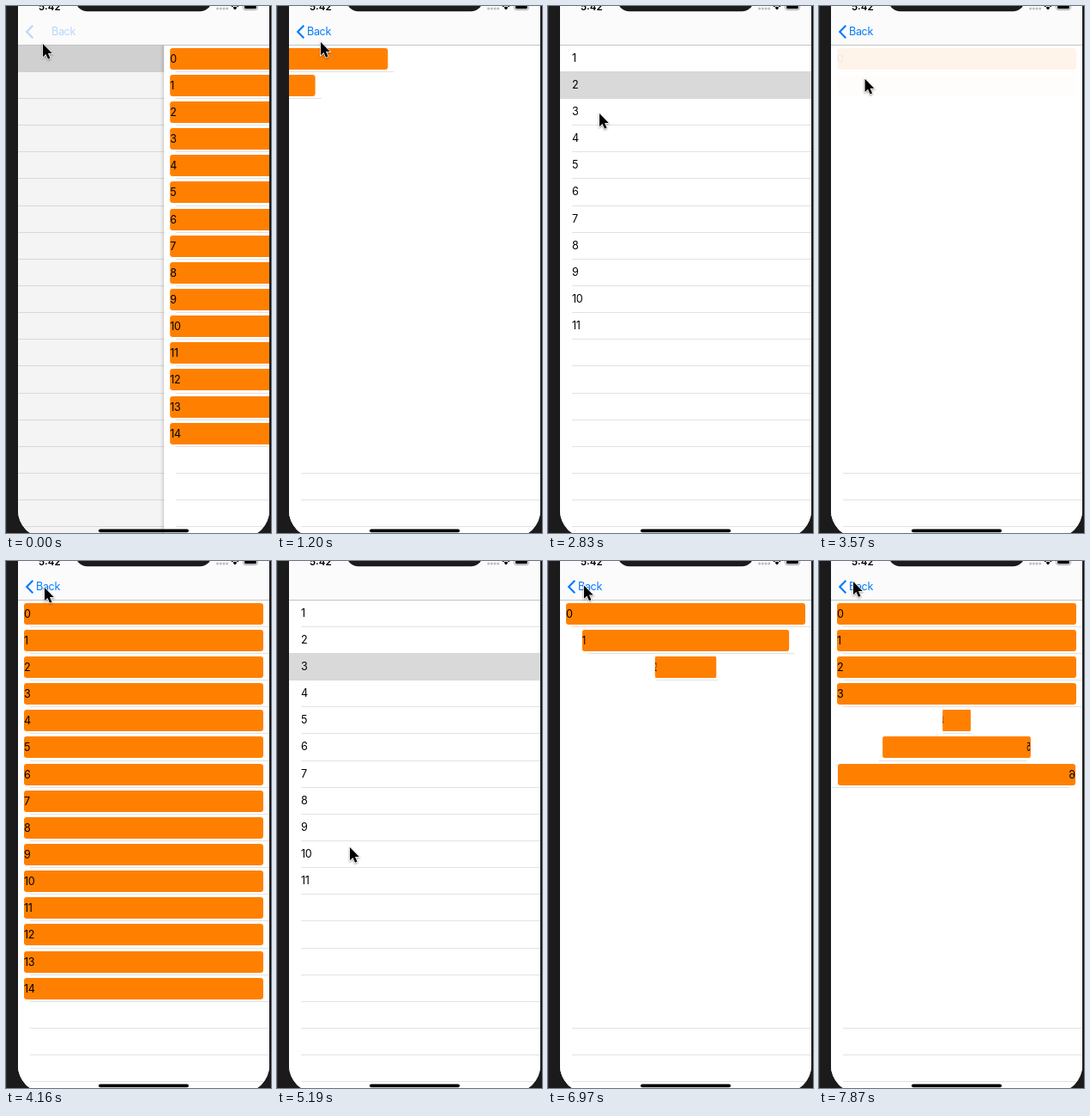
Write an HTML page that moves like this. It is 309 px wide and 613 px high and loops after 8000 ms.

```html
<!DOCTYPE html>
<html lang="en">
<head>
<meta charset="utf-8">
<title>Table view animations</title>
<style>
  html, body { margin: 0; width: 100%; height: 100%; overflow: hidden; }
  body { position: relative; background: #1b1b1b; font: 12.6px Inter, Roboto, sans-serif; color: #000; }
  div, svg { position: absolute; }
  #screen { left: 14px; top: 0; width: 293px; height: 618px; overflow: hidden; background: #fff; border-radius: 0 0 31px 31px; }
  .page, #dim { left: 0; top: 0; width: 293px; height: 618px; background: #fff; }
  #dim { background: #000; }
  .line { left: 14px; width: 279px; height: 1px; background: #e2e2e4; }
  .label { left: 14px; letter-spacing: -.3px; white-space: nowrap; }
  #mark { left: 0; width: 293px; background: #d9d9d9; }
  .cell { left: 0; width: 293px; }
  .bar { left: 7px; top: 3.8px; width: 279px; height: 24.8px; line-height: 25px; border-radius: 3.2px; background: #ff8000; letter-spacing: -.3px; }
  #nav { left: 0; top: 0; width: 293px; height: 45px; background: #fbfbfb; border-bottom: 1px solid #c2c2c4; }
  #back { left: 21px; top: 20px; line-height: 20px; color: #007aff; letter-spacing: -.35px; }
  #edge { left: 0; top: 0; width: 1px; height: 613px; background: #303030; }
</style>
</head>
<body>
<div id="screen">
  <div class="page" id="list"><div id="mark"></div></div>
  <div id="dim"></div>
  <div class="page" id="detail"></div>
  <div id="nav">
    <svg id="chevron" width="22" height="45" fill="none" stroke="#007aff" stroke-width="2.1"><path d="M17.3 22.8 10.2 30l7.1 7.2"/></svg>
    <div id="back">Back</div>
  </div>
</div>
<div id="edge"></div>
<svg id="chrome" width="309" height="613">
  <rect x="81" y="-30" width="159" height="36.3" rx="14" fill="#1b1b1b"/>
  <text x="38" y="4.6" font-family="Inter, Roboto, sans-serif" font-size="11.6" font-weight="600">5:42</text>
  <g fill="#bdbdbd"><circle cx="246.6" cy="3" r="1.5"/><circle cx="250.3" cy="3" r="1.5"/><circle cx="254" cy="3" r="1.5"/><circle cx="257.7" cy="3" r="1.5"/></g>
  <path d="M267 4.6 264.6 2a3.5 3.5 0 0 1 4.8 0zM262.5 0a6.5 6.5 0 0 1 9 0l-1.2 1.2a5 5 0 0 0-6.600 0z"/>
  <rect x="276.500" y="-5" width="17" height="9.600" rx="2.500" fill="none" stroke="#999" stroke-width=".8"/>
  <rect x="278" y="-4" width="14" height="7.300" rx="1.300"/>
  <rect x="108" y="608.500" width="105" height="3.700" rx="1.850"/>
</svg>
<svg id="cursor" width="20" height="26" viewBox="-2 -2 20 26" style="left:-2px;top:-2px;filter:drop-shadow(0 1px 1px #0006)">
  <path d="M0 0V15.200L3.500 12 6 17.800 8.500 16.700 6 11H10.800Z" stroke="#fff" stroke-width="1.500" paint-order="stroke"/>
</svg>
<script>
const LOOP = 8000, TICK = 148, WIDTH = 293, ROWS = 18, CELLS = 15;
const $ = id => document.getElementById(id);
const rowY = i => Math.floor(45.23 + 31.147 * i);
const clamp = v => Math.min(1, Math.max(0, v));

function add(parent, cls, style, text = '') {
  const el = document.createElement('div');
  el.className = cls;
  el.textContent = text;
  Object.assign(el.style, style);
  parent.append(el);
  return el;
}
const px = v => v + 'px';

// Static rows of both pages
const empties = [], cells = [];
for (let i = 0; i < ROWS; i++) {
  const top = px(rowY(i + 1));
  add($('list'), 'line', { top });
  empties.push(add($('detail'), 'line', { top }));
}
$('list').append($('mark'));
for (let i = 0; i < 11; i++) {
  add($('list'), 'label', { top: px(rowY(i)), lineHeight: '32px' }, i + 1);
}
for (let i = 0; i < CELLS; i++) {
  const height = rowY(i + 1) - rowY(i);
  const cell = add($('detail'), 'cell', { top: px(rowY(i)), height: px(height + 1) });
  add(cell, 'line', { top: px(height) });
  add(cell, 'bar', {}, i);
  cells.push(cell);
}

// Cell entrances: t is ms since the data was loaded
function springIn(t, i) {
  const s = Math.max(0, t / 1000 - i * 0.4 / CELLS);
  const w = 24.7, decay = 0.7 * w, wd = w * Math.sqrt(1 - 0.49);
  const rest = Math.exp(-decay * s) * (Math.cos(wd * s) + (decay - 1 / 0.7) / wd * Math.sin(wd * s));
  return { x: -WIDTH * rest };
}
function fadeIn(t, i) {
  return { alpha: clamp((t - i * 20) / 300) };
}
function spinIn(t, i) {
  const s = t - i * 250, turns = (s - 100) / 200;
  const spinning = turns >= 0 && turns < 3;
  return { alpha: clamp(s / 100), scale: spinning ? Math.cos(Math.PI * (1 - turns % 1)) : 1 };
}

const visits = [
  { row: 0, push: -3000, load: -2500, pop: -122, enter: fadeIn },
  { row: 1, push: 680, load: 1140, pop: 2190, enter: springIn },
  { row: 2, push: 3050, load: 3540, pop: 4540, enter: fadeIn },
  { row: 10, push: 5750, load: 6263, pop: Infinity, enter: spinIn }
];

// Pointer stops: time, x, y
const path = [
  [0, 43, 44], [445, 55, 95], [742, 55, 95], [1188, 51, 42], [1640, 44, 32], [2200, 44, 32],
  [2821, 60, 125], [3118, 60, 125], [4158, 45, 31], [4603, 45, 31], [5197, 85, 333],
  [5494, 88, 370], [5791, 88, 370], [6088, 133, 66], [6500, 43, 31], [7870, 40, 24]
];
function pointer(t) {
  const n = path.findIndex(p => p[0] >= t);
  if (n < 1) return path[n ? path.length - 1 : 0].slice(1);
  const a = path[n - 1], b = path[n], k = (t - a[0]) / (b[0] - a[0]);
  return [a[1] + (b[1] - a[1]) * k, a[2] + (b[2] - a[2]) * k];
}

// Share of a page slide still to go
function slideLeft(ms) {
  const x = Math.max(0, ms) * 0.016;
  return ms > 500 ? 0 : (1 + x) * Math.exp(-x);
}

function render(t) {
  const v = visits.filter(v => v.push <= t).pop();
  const off = t >= v.pop ? 1 - slideLeft(t - v.pop) : slideLeft(t - v.push);
  const loaded = t >= v.load;

  $('list').style.transform = `translateX(${-0.3 * WIDTH * (1 - off)}px)`;
  $('dim').style.opacity = 0.1 * (1 - off);
  $('detail').style.transform = `translateX(${off * WIDTH}px)`;
  $('detail').style.boxShadow = off > 0 && off < 1 ? '-1px 0 4px #0003' : 'none';
  $('mark').style.top = px(rowY(v.row));
  $('mark').style.height = px(rowY(v.row + 1) - rowY(v.row) + 1);

  const tint = clamp(1 - 1.25 * off);
  $('chevron').style.opacity = $('back').style.opacity = tint;
  $('back').style.transform = `translateX(${31 * off}px)`;

  empties.forEach((el, i) => el.style.opacity = loaded && i < CELLS ? 0 : 1);
  cells.forEach((el, i) => {
    const { x = 0, alpha = 1, scale = 1 } = v.enter(t - v.load, i);
    el.style.opacity = loaded ? alpha : 0;
    el.style.transform = `translateX(${x}px) scaleX(${scale})`;
  });

  const [cx, cy] = pointer(t);
  $('cursor').style.transform = `translate(${cx}px, ${cy}px)`;
}

const start = performance.now();
function frame() {
  const t = (performance.now() - start) % LOOP;
  render(Math.min(53, Math.floor(t / TICK)) * 148.5);
  requestAnimationFrame(frame);
}
frame();
</script>
</body>
</html>
```
